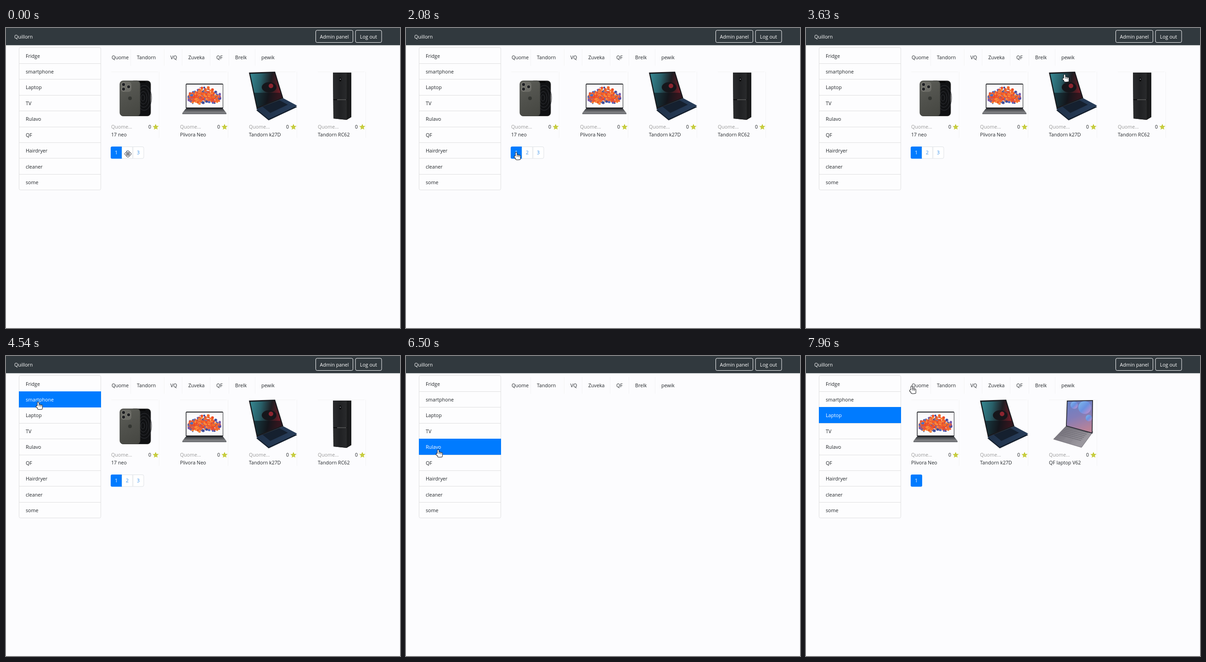
An HTML page with a canvas that plays this animation: 858x653 px, repeating every 8 s.

```html
<!DOCTYPE html>
<html lang="en">
<head>
<meta charset="utf-8">
<title>Shop</title>
<style>
  html, body { margin: 0; width: 100%; height: 100%; overflow: hidden; background: #fcfcfe; }
  canvas { display: block; }
</style>
</head>
<body>
<canvas id="stage" width="858" height="653"></canvas>
<script>
const ctx = document.getElementById('stage').getContext('2d');
const LOOP = 8000, LOAD = 110, TRAVEL = 700;
const BLUE = '#007bff', INK = '#212529', LINE = '#dfdfe0', FAINT = '#f3f3f4';
const ROW = 34.42, TOP = 42.5;

const categories = ['Fridge', 'smartphone', 'Laptop', 'TV', 'Rulavo', 'QF', 'Hairdryer', 'cleaner', 'some'];
const brands = { Quome: 230, Tandorn: 285, VQ: 358, Zuveka: 397, QF: 458, Brelk: 499, pewik: 556 };

const products = {
  phone: ['17 neo', drawPhone],
  splash: ['Plivora Neo', drawSplashLaptop],
  gaming: ['Tandorn k27D', drawGamingLaptop],
  fridge: ['Tandorn RC62', drawFridge],
  fridge3: ['3', drawFridge],
  slim: ['QF laptop V62', drawSlimLaptop],
  phone2: ['Ovalto KR', drawPhone],
  studs: ['Ovalto 27', drawStuds]
};
const pages = [['phone', 'splash', 'gaming', 'fridge'], ['fridge3', 'slim', 'phone2', 'studs'], ['phone']];
const shelves = {
  Fridge: ['fridge', 'fridge3'],
  smartphone: ['phone', 'phone2', 'studs'],
  Laptop: ['splash', 'gaming', 'slim']
};

// Places the pointer can go.
const page = n => ({ page: n, x: 216 + n * 24, y: 271 });
const row = i => ({ row: i, x: 70, y: TOP + (i + 0.7) * ROW });
const card = i => ({ x: 248 + i * 150, y: 119 });
const brand = i => ({ x: 230 + i * 60, y: 66 });

const visit = (time, place) => ({ time, place });
const click = (time, place) => ({ time, place, clicked: true });
const story = [
  visit(0, page(2)), click(410, page(2)), visit(960, page(3)), click(1220, page(3)),
  click(1600, page(1)), visit(2790, card(0)), visit(3400, card(3)), visit(4000, brand(1)),
  click(4500, row(1)), click(5040, row(0)), click(5710, row(2)), click(6080, row(3)),
  visit(6330, row(4)), click(6500, row(4)), click(7300, row(2)), visit(7960, brand(0))
];

function stateAt(t) {
  const clicks = story.filter(s => s.clicked).map(s => ({ time: s.time, ...s.place }));
  const chosen = clicks.filter(c => c.time <= t && 'row' in c).pop();
  const loaded = clicks.filter(c => c.time + LOAD <= t).pop() || { page: 1 };
  const selected = chosen ? chosen.row : -1;
  if (loaded.page) return { selected, items: pages[loaded.page - 1], active: loaded.page, count: pages.length };
  const items = shelves[categories[loaded.row]] || [];
  return { selected, items, active: 1, count: items.length ? 1 : 0 };
}

function pointerAt(t) {
  const i = story.findIndex(s => s.time > t);
  if (i < 0) return story[story.length - 1].place;
  const from = story[i - 1], to = story[i];
  const span = Math.min(TRAVEL, to.time - from.time);
  const k = Math.max(0, 1 - (to.time - t) / span), e = k * k * (3 - 2 * k);
  const mix = axis => from.place[axis] + (to.place[axis] - from.place[axis]) * e;
  return { x: mix('x'), y: mix('y') };
}

function text(str, x, y, color = INK, align = 'left') {
  ctx.font = '10.65px "Open Sans", "Noto Sans", sans-serif';
  ctx.textAlign = align;
  ctx.fillStyle = color;
  ctx.fillText(str, x, y);
}

function rect(x, y, w, h, fill) {
  ctx.fillStyle = fill;
  ctx.fillRect(x, y, w, h);
}

function paint(fill, stroke, width = 1) {
  if (fill) { ctx.fillStyle = fill; ctx.fill(); }
  if (stroke) { ctx.strokeStyle = stroke; ctx.lineWidth = width; ctx.stroke(); }
}

function box(x, y, w, h, r, fill, stroke, width) {
  ctx.beginPath();
  ctx.roundRect(x, y, w, h, r);
  paint(fill, stroke, width);
}

function poly(points, fill, stroke) {
  ctx.beginPath();
  points.forEach(([x, y]) => ctx.lineTo(x, y));
  ctx.closePath();
  paint(fill, stroke);
}

function disc(x, y, r, fill, stroke, ry = r) {
  ctx.beginPath();
  ctx.ellipse(x, y, r, ry, 0, 0, Math.PI * 2);
  paint(fill, stroke);
}

function fade(x0, y0, x1, y1, ...colors) {
  const g = ctx.createLinearGradient(x0, y0, x1, y1);
  colors.forEach((c, i) => g.addColorStop(i / (colors.length - 1), c));
  return g;
}

function within(points, draw) {
  ctx.save();
  poly(points);
  ctx.clip();
  draw();
  ctx.restore();
}

// Shrinks a shape towards its middle, for bezels and rims.
function inset(points, scale) {
  const mean = axis => points.reduce((sum, p) => sum + p[axis], 0) / points.length;
  const mid = [mean(0), mean(1)];
  return points.map(p => p.map((v, axis) => mid[axis] + (v - mid[axis]) * scale));
}

function seeded(seed) {
  return () => (seed = (seed * 16807) % 2147483647) / 2147483647;
}

function drawPhone() {
  box(42, 20, 44, 76.5, 7, '#101113', '#3c3c3a');
  for (let r = 4; r < 17; r += 4) disc(68 + r / 4, 57, r, null, '#323338', r * 1.7);
  box(62, 21, 13, 3, 2, '#050505');
  box(19, 20, 44, 76.5, 7, fade(19, 20, 63, 96, '#5d5e58', '#50514c', '#454641'), '#3b3c38');
  box(21, 22, 23, 22, 6, '#6b6b65');
  for (let i = 0; i < 3; i++) disc(i === 1 ? 38 : 27, 28 + i * 5, 4, '#202124', '#8d8d86');
  disc(41, 58, 4, '#343632');
}

function drawSplashLaptop() {
  box(12.5, 26, 81.5, 55, 2, '#25272b');
  rect(14, 28, 79, 50, '#fbfafc');
  const rnd = seeded(41);
  const warm = ['#f26a2e', '#ee4b25', '#f98a3c', '#e2553f'], cool = ['#4a6fc4', '#7a5cae', '#3d4f9e'];
  for (let i = 0; i < 420; i++) {
    const u = rnd(), v = rnd() + rnd() - 1, x = 19 + u * 68;
    const y = 54 + 3 * Math.sin(u * 9) + v * (10 + 10 * Math.sin(u * Math.PI));
    const edge = Math.abs(u - 0.5) > 0.4 || Math.abs(v) > 0.65;
    const hues = rnd() < (edge ? 0.5 : 0.08) ? cool : warm;
    disc(x, y, 1 + rnd() * 2.2, hues[i % hues.length]);
  }
  poly([[12, 81], [94, 81], [101, 90], [5, 90]], fade(0, 81, 0, 90, '#3a3c40', '#8b8c8f'));
  rect(5, 90, 96, 2.5, '#66686c');
}

function drawGamingLaptop() {
  const base = [[16, 81], [75, 58], [105, 74], [43, 103]];
  const lid = [[0, 2], [57, 0], [75, 58], [17, 81]];
  ctx.save();
  ctx.translate(0, 3);
  poly(base, '#141f2e');
  ctx.restore();
  poly(base, fade(20, 75, 90, 95, '#20324a', '#273c58'));
  poly(inset(base, 0.62).map(([x, y]) => [x - 3, y - 4]), '#15202f');
  poly(lid, '#17191d');
  within(inset(lid, 0.92), () => {
    rect(0, 0, 75, 80, fade(3, 20, 68, 32, '#35838d', '#285f68', '#1e1c21', '#6b1d27'));
    disc(44, 34, 16, '#16161b', null, 11);
    disc(48, 31, 5, '#8c2530');
    rect(0, 46, 75, 34, 'rgba(12,18,24,.6)');
  });
}

function drawFridge() {
  poly([[33, 2], [73, 2], [73, 99], [63, 105], [34, 102]], '#1a1b1c');
  poly([[33, 2], [63, 3], [63, 105], [34, 102]], fade(33, 0, 63, 0, '#2b2c2e', '#202123', '#292a2c'));
  rect(47, 13, 4, 8, '#09090a');
  rect(48, 15, 2, 3, '#63666b');
  rect(34, 60, 29, 2, '#0a0a0b');
  rect(42, 60.5, 20, 1, '#8a8b8c');
}

function drawSlimLaptop() {
  const base = [[38, 57], [96, 70], [71, 104], [10, 86]];
  const lid = [[39, 2], [96, 1], [95, 74], [37, 58]];
  poly(base, fade(30, 60, 60, 100, '#77747d', '#9a979e'), '#74717a');
  for (let i = 0; i < 6; i++)
    poly([[37 - i * 3, 61 + i * 3], [85 - i * 3, 72 + i * 3.4]], null, '#716e77');
  poly(inset(base, 0.27).map(([x, y]) => [x - 12, y + 9]), '#8b8890');
  poly(lid, '#292a34');
  within(inset(lid, 0.94), () => {
    rect(36, 0, 62, 76, fade(45, 3, 70, 70, '#6681c6', '#827db9', '#b98298'));
    const bubble = (x, y, r) => disc(x, y, r, fade(x - r, y - r, x + r, y + r, '#81bbed', '#6a91e0', '#d08fc8'));
    bubble(78, 17, 14);
    bubble(55, 12, 8);
    bubble(87, 40, 7);
  });
}

function drawStuds() {
  rect(0, 0, 105, 105, '#fff');
  const metals = [['#f4d35b', '#c99a13'], ['#77797c', '#25272a'], ['#e5e3dc', '#8f8d87']];
  metals.forEach(([light, dark], i) => {
    const x = 20 + i * 32, top = 11 + i * 3;
    const shade = fade(x - 9, 0, x + 9, 0, dark, light, dark, light);
    ctx.beginPath();
    ctx.moveTo(x, top);
    ctx.quadraticCurveTo(x + 8, top + 14, x + 9, 40);
    ctx.quadraticCurveTo(x, 55, x - 9, 40);
    ctx.quadraticCurveTo(x - 8, top + 14, x, top);
    paint(shade);
    disc(x, 81, 8, shade, null, 6);
    box(x - 3, 54, 6, 28, 2, shade);
    disc(x, 84, 5, dark, null, 3);
    for (let y = 58; y < 75; y += 3) rect(x - 3, y, 6, 0.7, dark);
  });
}

function drawStar(x, y) {
  const at = (i, r) => [x + r * Math.sin(i * Math.PI / 5), y - r * Math.cos(i * Math.PI / 5)];
  for (let i = 0; i < 10; i++)
    poly([[x, y], at(i, i % 2 ? 3 : 7), at(i + 1, i % 2 ? 7 : 3)], i % 2 ? '#a7b20e' : '#d3d62c');
}

function drawHeader() {
  rect(0, 0, 858, 37.5, '#31393e');
  text('Quillorn', 18, 22.5, '#fff');
  box(674.5, 5, 81, 26.5, 3, null, '#f8f9fa');
  box(761, 5, 57, 26.5, 3, null, '#f8f9fa');
  text('Admin panel', 715, 22.5, '#fff', 'center');
  text('Log out', 789.5, 22.5, '#fff', 'center');
}

function drawSidebar(selected) {
  box(28.5, TOP, 178, 310, 3, '#fdfdfe', LINE);
  for (let i = 1; i < categories.length; i++) rect(29, Math.round(TOP + i * ROW), 178, 1, LINE);
  if (selected >= 0) box(28, Math.round(TOP + selected * ROW), 179, 35, selected ? 0 : [3, 3, 0, 0], BLUE);
  categories.forEach((name, i) => text(name, 43, 64.6 + i * ROW, i === selected ? '#fff' : INK));
}

function drawBrands() {
  Object.entries(brands).forEach(([name, x], i) => {
    if (i) rect(x - 14, 46, 1, 36, FAINT);
    text(name, x, 67.5);
  });
}

function drawProduct(key, i) {
  const [name, draw] = products[key], x = 229 + i * 150;
  rect(x, 95, 102, 1, FAINT);
  rect(x + 104, 95, 1, 144, FAINT);
  ctx.save();
  ctx.translate(x, 95);
  draw();
  ctx.restore();
  text('Quome...', x, 219.3, '#999');
  text('0', x + 81, 219.3);
  drawStar(x + 97, 215.7);
  text(name, x, 236);
}

function drawPages(active, count, tip) {
  for (let n = 1; n <= count; n++) {
    const { x, y } = page(n), on = n === active;
    const hover = Math.abs(tip.x - x) < 12 && Math.abs(tip.y - y) < 13;
    const left = n === 1 ? 3 : 0, right = n === count ? 3 : 0, r = [left, right, right, left];
    if (on) box(x - 12, 258, 25, 26.5, r, BLUE);
    else box(x - 11.5, 258.5, 23.5, 25.5, r, hover ? '#e9ecef' : '#fff', '#dee2e6');
    text(n, x, y + 4.3, on ? '#fff' : hover ? '#0056b3' : '#3c93ea', 'center');
  }
}

function drawMoveCursor(x, y) {
  ctx.save();
  ctx.translate(x, y);
  rect(-6, -6, 12, 12, '#fff');
  for (let i = 0; i < 4; i++) {
    poly([[-1.4, -1.4], [-1.4, -4.5], [-3.5, -4.5], [0, -8], [3.5, -4.5], [1.4, -4.5], [1.4, -1.4]], '#fff', '#30333d');
    ctx.rotate(Math.PI / 2);
  }
  ctx.restore();
}

function drawHand(x, y) {
  const shape = (fill, stroke) => {
    for (let i = 0; i < 4; i++) box(i * 2.5 - 1.3, i ? 4.5 + i * 0.6 : 0, 2.6, 9, 1.3, fill, stroke, 2);
    box(-4, 8, 4, 3.4, 1.7, fill, stroke, 2);
    box(-1.3, 8, 9, 7.5, [1, 1, 3, 3], fill, stroke, 2);
  };
  ctx.save();
  ctx.translate(x, y);
  shape(null, '#17181c');
  shape('#fff');
  for (let i = 1; i < 4; i++) rect(i * 2.5 - 1.4, 5 + i * 0.5, 0.8, 3.5, '#17181c');
  ctx.restore();
}

function render(t) {
  const { selected, items, active, count } = stateAt(t);
  const tip = pointerAt(t), moving = t < 130;
  rect(0, 0, 858, 653, '#fcfcfe');
  drawHeader();
  drawSidebar(selected);
  drawBrands();
  items.forEach(drawProduct);
  drawPages(active, count, moving ? { x: 0, y: 0 } : tip);
  if (moving) drawMoveCursor(tip.x + 1.5, tip.y + 3);
  else drawHand(tip.x, tip.y);
}

const start = performance.now();
function tick() {
  render((performance.now() - start) % LOOP);
  requestAnimationFrame(tick);
}
tick();
</script>
</body>
</html>
```
